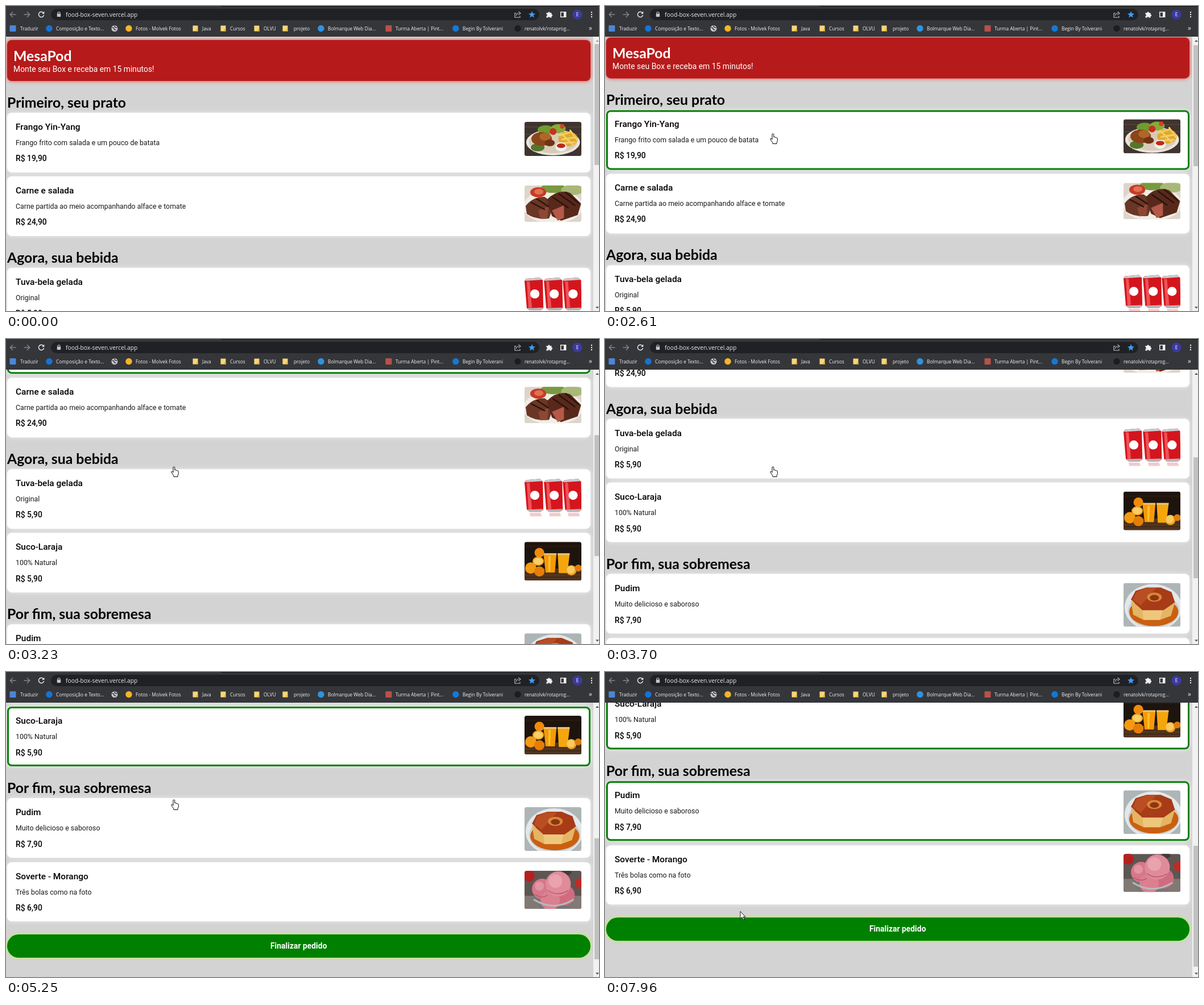
An HTML page for the animation above (8000 ms loop, 1043x537 px).

```html
<!DOCTYPE html>
<html lang="pt-BR">
<head>
<meta charset="utf-8">
<title>MesaPod</title>
<style>
  html, body { margin: 0; width: 100%; height: 100%; overflow: hidden; background: #d3d3d3; }
  #stage { position: relative; width: 1043px; height: 537px; overflow: hidden; font-family: Roboto, sans-serif; color: #000; }
  #view { position: absolute; left: 0; top: 54px; width: 1033px; height: 483px; overflow: hidden; background: #d3d3d3; }
  #page { position: absolute; left: 0; top: -54px; width: 1033px; height: 1080px; }
  #page div, #page svg { position: absolute; box-sizing: border-box; }
  .line { line-height: 20px; white-space: nowrap; }
  .head { font: 700 24.8px/20px Lato, sans-serif; }
  .name { font-size: 15.45px; font-weight: 500; }
  .desc { font-size: 12.36px; color: #1a1a1a; }
  .price { font-size: 13.9px; font-weight: 500; }
  .card { left: 1.5px; width: 1026.5px; height: 104.5px; border: 3.9px solid #fff; border-radius: 8px; background: #fff; box-shadow: 0 0 8px rgba(255, 255, 255, .6); }
  .banner { left: 1.5px; top: 60px; width: 1026.5px; height: 71.5px; border-radius: 8px; background: #b71a1a; box-shadow: 0 0 6px rgba(255, 0, 0, .75); }
  .order { left: 1.5px; top: 974px; width: 1026.5px; height: 40.5px; border-radius: 20.3px; background: #008000; box-shadow: 0 0 5px #adff2f; color: #fff; font: 700 13.9px/41px Roboto, sans-serif; text-align: center; }
  .photo { left: 911.5px; width: 100.5px; border-radius: 3.5px; overflow: hidden; }
  #ui { position: absolute; left: 0; top: 0; }
  #ui text { font-family: "Open Sans", sans-serif; }
</style>
</head>
<body>
<div id="stage">
  <div id="view"><div id="page"></div></div>
  <svg id="ui" width="1043" height="537" viewBox="0 0 1043 537">
    <rect x="1033" y="54" width="10" height="483" fill="#f1f1f1"/>
    <rect id="thumb" x="1035" y="67" width="8" height="213" fill="#c1c1c1"/>
    <path id="up" d="M1037 63l3-3.2 3 3.2z"/>
    <path d="M1037 529.5l3 3.2 3-3.2z" fill="#505050"/>
    <rect width="1043" height="54" fill="#35363a"/>
    <rect x="378" width="665" height="1" fill="#111"/>
    <rect x="79" y="5" width="859" height="20" rx="10" fill="#202124"/>
    <g fill="none" stroke="#85878b" stroke-width="1.4">
      <path d="M17.500 15H7.500M12 10.300L7.300 15L12 19.700M31.500 15H41.500M37 10.300L41.700 15L37 19.700"/>
      <path stroke="#eee" d="M65.600 11.700A4.700 4.700 0 1 0 66.700 16"/>
      <path stroke="#c4c6c9" stroke-width="1.100" d="M897.500 12.500H895V20H904V17.500M897.500 17Q898 13 902 12.700M901.500 10L905 12.800L901.500 15.600"/>
      <path stroke="#c4c6c9" stroke-width="1.200" d="M91 14V12.500a2 2 0 0 1 4 0V14"/>
      <rect x="975.700" y="10.700" width="9" height="8.600" stroke="#f1f1f1"/>
    </g>
    <path d="M67.300 9.500V13.700H63.100z" fill="#eee"/>
    <rect x="89.800" y="13.600" width="6.400" height="5.400" rx=".6" fill="#c4c6c9"/>
    <path d="M925 9l1.700 4 4.300.4-3.300 2.800 1 4.200-3.700-2.300-3.700 2.300 1-4.200-3.300-2.800 4.300-.4z" fill="#3b9cf5"/>
    <path d="M950.500 12h2.800a1.700 1.700 0 1 1 3.400 0h2.800v2.800a1.700 1.700 0 1 1 0 3.400v2.300h-3a1.500 1.500 0 0 0-3 0h-3v-3a1.500 1.500 0 0 0 0-3z" fill="#f1f1f1"/>
    <path d="M981 11h4v8h-4z" fill="#f1f1f1"/>
    <circle cx="1005" cy="15" r="8.600" fill="#3c3aa0"/>
    <text x="1005" y="18" font-size="8.300" fill="#fff" text-anchor="middle">E</text>
    <g fill="#eee"><circle cx="1030" cy="11" r="1.200"/><circle cx="1030" cy="15" r="1.200"/><circle cx="1030" cy="19" r="1.200"/></g>
    <text x="105" y="18.500" font-size="10.300" fill="#e8eaed">food-box-seven.vercel.app</text>
    <g id="marks" font-size="8.350" fill="#f1f1f1"></g>
    <g fill="#fff" stroke="#000" stroke-linejoin="round">
      <path id="hand" d="M4 1.800Q5.500-.3 6.800 1.800V6.600Q8.400 5.800 9 7.200Q10.600 6.600 11.200 8Q13.200 7.600 13.400 9.600V12.500Q13.200 15 12 16.500V18.500H5V16.800Q3 14 .8 10.600Q.6 8.600 2.600 9.400L4 11Z"/>
      <path id="arrow" stroke-width=".9" d="M0 .5V13.500L3 10.800L5 15.500L7 14.700L5 10.100H9Z"/>
    </g>
  </svg>
</div>
<script>
const LOOP = 8000;
const $ = id => document.getElementById(id);

// small SVG helpers for the pictures
const disc = (x, y, rx, fill, ry = rx) => `<ellipse cx="${x}" cy="${y}" rx="${rx}" ry="${ry}" fill="${fill}"/>`;
const shape = (d, fill) => `<path d="${d}" fill="${fill}"/>`;
const box = (x, y, w, h, fill, r = 0) => `<rect x="${x}" y="${y}" width="${w}" height="${h}" rx="${r}" fill="${fill}"/>`;
const stroke = (d, color, w) => `<path d="${d}" fill="none" stroke="${color}" stroke-width="${w}" stroke-linecap="round"/>`;

const can = x => `<g transform="translate(${x} 0)">`
  + shape('M3 3L27 1L32 6L33 55L28 59H9L4 55L0 7Z', '#d4151d')
  + shape('M3 3L27 1L31 5L1 7Z', '#c9c9cc') + shape('M4 55L33 54L28 59H9Z', '#b9b4b6')
  + shape('M4 8L9 8L13 54L7 55Z', '#ee5257') + disc(18, 30, 8, '#fff')
  + shape('M9 61H28L30 67H10Z', '#f3c9cb') + '</g>';

const photos = {
  chicken: [60, box(0, 0, 100, 60, '#40342e') + stroke('M0 9H100M0 22H100', '#5d4d44', 1)
    + disc(50, 36, 47, '#e9e4de', 23) + disc(50, 35, 42, '#d8cbb8', 20)
    + disc(37, 14, 14, '#6f9c2c', 8) + disc(59, 12, 13, '#86ab38', 8) + disc(50, 17, 6, '#c9301f') + disc(66, 8, 4, '#d6402a')
    + disc(23, 45, 12, '#55762a', 7) + disc(30, 30, 18, '#8a451b', 12) + disc(36, 26, 10, '#b0662a', 7) + disc(44, 37, 9, '#6f3414', 6)
    + disc(76, 30, 17, '#e2a92f', 13) + stroke('M62 24L80 18M66 31L90 27M70 37L88 36M64 20L84 40M80 15L92 32', '#f3cf62', 3)
    + disc(64, 44, 10, '#f4f1ec', 8) + disc(64, 42, 7.500, '#bd2a18', 4)],
  steak: [64, box(0, 0, 100, 64, '#ddd5ca') + disc(50, 37, 52, '#f0ece6', 30)
    + disc(50, 5, 22, '#78993f', 8) + disc(84, 8, 20, '#a9b878', 9) + disc(24, 12, 14, '#c73a26', 9) + disc(25, 11, 8, '#df7253', 5)
    + shape('M2 36Q14 20 35 20L52 32L43 58Q20 61 4 50Z', '#6a3625')
    + shape('M39 25Q58 5 80 13L99 32L93 52L64 62L48 54Z', '#58291b')
    + shape('M48 44L69 35L69 57L58 62Z', '#b45949') + shape('M24 44L42 37L40 57L28 59Z', '#8d4834')
    + stroke('M50 21L76 39M61 15L88 35M72 12L95 31M12 30L35 42M22 24L42 37', '#2c130d', 2.500)],
  cans: [74, box(0, 0, 100, 74, '#fff') + can(0) + can(34) + can(67)],
  juice: [67.500, box(0, 0, 100, 68, '#1e140e') + box(0, 47, 100, 21, '#51341f') + stroke('M0 8H100M0 55H100M0 62H100', '#35210f', 1)
    + disc(26, 19, 8.500, '#f08a0c') + disc(11, 46, 10, '#f39a12') + disc(26, 52, 9, '#e67d08')
    + disc(24, 34, 10, '#f0a321', 8) + disc(24, 34, 8, '#f9cf66', 6)
    + shape('M33 21H56L53 54H37Z', '#f59a07') + shape('M58 21H79L75 55H60Z', '#f5a60d') + box(34, 20, 22, 3, '#e8c47c') + box(58, 20, 21, 3, '#e8c47c')
    + shape('M42 25H46L45 52H42Z', '#ffc02f') + disc(82, 50, 9, '#f2a01c') + disc(81, 49, 7, '#f8cb61') + disc(94, 46, 6, '#df7d0b')],
  flan: [76.500, box(0, 0, 100, 77, '#aeb5b7') + disc(52, 43, 50, '#e3e7e8', 41) + disc(53, 49, 45, '#c9cfd1', 30) + disc(53, 51, 43, '#cb5f10', 25)
    + shape('M13 31L17 56L35 65H64L83 58L90 34L70 47H33Z', '#e4b564') + shape('M33 46L35 65H64L69 46Z', '#eec77c')
    + shape('M13 29L21 14L40 8H65L84 16L90 34L70 48H33Z', '#a83b18') + shape('M22 16L40 9H57L30 40L17 30Z', '#b94e22')
    + disc(54, 25, 13, '#d8873a', 8) + disc(54, 26, 8, '#8e3514', 5)],
  icecream: [67, box(0, 0, 100, 67, '#5d5653') + box(0, 44, 100, 23, '#817974') + disc(8, 9, 10, '#b5201f') + disc(97, 22, 9, '#c22a24') + disc(74, 3, 8, '#443a37', 5)
    + shape('M14 44H88L77 67H28Z', '#77777a') + disc(31, 32, 18, '#d6778a') + disc(70, 43, 18, '#cf6c80') + disc(45, 52, 17, '#da8090')
    + disc(59, 23, 22, '#e08b9a') + disc(54, 18, 12, '#eaa2ae') + disc(26, 27, 8, '#e394a2')
    + stroke('M17 51Q50 72 85 51', '#b9b9bc', 3) + stroke('M42 35Q57 46 76 35M19 42Q30 50 40 43', '#b9586d', 1.500)],
};

// [top, name, description, price, picture]
const cards = [
  [188, 'Frango Yin-Yang', 'Frango frito com salada e um pouco de batata', '19,90', 'chicken'],
  [300.200, 'Carne e salada', 'Carne partida ao meio acompanhando alface e tomate', '24,90', 'steak'],
  [461.100, 'Tuva-bela gelada', 'Original', '5,90', 'cans'],
  [573.400, 'Suco-Laraja', '100% Natural', '5,90', 'juice'],
  [734.400, 'Pudim', 'Muito delicioso e saboroso', '7,90', 'flan'],
  [846.700, 'Soverte - Morango', 'Três bolas como na foto', '6,90', 'icecream'],
];

const line = (cls, x, mid, text, style = '') =>
  `<div class="line ${cls}" style="left:${x}px;top:${mid - 10}px;${style}">${text}</div>`;

function cardHtml([top, name, desc, price, pic]) {
  const [h, art] = photos[pic];
  return `<div class="card" style="top:${top}px"></div>`
    + line('name', 17, top + 25, name) + line('desc', 17, top + 53, desc) + line('price', 17, top + 80.200, 'R$ ' + price)
    + `<svg class="photo" style="top:${top + 15.700}px;height:${h}px" viewBox="0 0 100 ${h}" preserveAspectRatio="none">${art}</svg>`;
}

$('page').innerHTML = '<div class="banner"></div>'
  + line('head', 13, 88, 'MesaPod', 'color:#fff')
  + line('', 13, 111.300, 'Monte seu Box e receba em 15 minutos!', 'color:#fff;font-size:13.9px')
  + line('head', 2, 169.500, 'Primeiro, seu prato')
  + line('head', 2, 442.700, 'Agora, sua bebida')
  + line('head', 2, 715.900, 'Por fim, sua sobremesa')
  + cards.map(cardHtml).join('')
  + '<div class="order">Finalizar pedido</div>';

// bookmarks: [icon x, text x, label, icon kind, colour]
const folder = '#f7d774';
const marks = [
  [12, 25, 'Traduzir', 'square', '#4a86d8'],
  [76, 88, 'Composição e Texto...', 'disc', '#1673d6'],
  [191, 0, '', 'globe', '#c9cbce'],
  [216, 228, 'Fotos - Molvek Fotos', 'disc', '#f4b526'],
  [333, 345, 'Java', 'folder', folder],
  [382, 394, 'Cursos', 'folder', folder],
  [441, 453, 'OLVU', 'folder', folder],
  [491, 506, 'projeto', 'folder', folder],
  [554, 566, 'Bolmarque Web Dia...', 'disc', '#2f94df'],
  [673, 685, 'Turma Aberta | Pint...', 'square', '#b8514a'],
  [791, 803, 'Begin By Tolverani', 'disc', '#1479d6'],
  [900, 912, 'renatolvk/rotaprog...', 'disc', '#1c1d20'],
];
const icons = {
  square: (x, c) => box(x - 5.500, 34, 11, 11, c, 1),
  disc: (x, c) => disc(x, 39.500, 5.700, c),
  folder: (x, c) => shape(`M${x - 4.500} 34.500h9v10h-9z`, c) + shape(`M${x + 2} 41h3v3.500h-3z`, '#e0ac3c'),
  globe: (x, c) => disc(x, 39.500, 5.500, c) + stroke(`M${x - 4} 38q3 0 3 2t3 2M${x} 35q0 3 4 3`, '#35363a', 1.500),
};
$('marks').innerHTML = marks.map(([x, tx, label, kind, color]) =>
  icons[kind](x, color) + `<text x="${tx}" y="42.500">${label}</text>`).join('')
  + '<text x="1025" y="43" font-size="12">»</text>';

// timelines: each value holds until the next time
const scrollSteps = [
  [0, 0], [2610, 4.600], [2680, 27], [2750, 55], [2820, 83], [2890, 111], [2960, 137.700],
  [3060, 173], [3120, 200], [3180, 222], [3230, 231.800],
  [3490, 236.400], [3560, 260], [3630, 290], [3700, 320.400], [3770, 352], [3840, 376], [3910, 386.600],
  [4910, 391.500], [4980, 418], [5060, 450], [5140, 483], [5220, 512], [5310, 533], [5390, 541.700],
];
const picks = {
  0: [[0, 0], [1910, .35], [2010, .8], [2110, 1]],
  3: [[0, 0], [4260, .35], [4320, .8], [4380, 1]],
  4: [[0, 0], [7000, .5], [7070, 1]],
  5: [[0, 0], [6080, .5], [6200, 1], [7000, .5], [7070, 0]],
};
const rest = [295, 224];
const entry = Array.from({ length: 12 }, (_, i) => {
  const left = (1 - i / 11) ** 1.600;
  return [260 + i * 69.090, [rest[0] + 649 * left, rest[1] + 302 * left]];
});
const cursorSteps = [
  [0, null], ...entry, [1020, rest],
  [5590, [283, 250]], [5660, [262, 305]], [5730, [241, 360]], [5800, [231, 386]],
  [6660, [222, 345]], [6730, [211, 300]], [6800, [215, 276]],
  [7820, [222, 320]], [7890, [236, 385]], [7960, [238, 421]],
];

function at(steps, t) {
  let value = steps[0][1];
  for (const [time, v] of steps) if (time <= t) value = v;
  return value;
}

const cardEls = document.querySelectorAll('.card');

function placeCursor(pos, scroll) {
  const over = pos && cards.some(([top]) => pos[1] + scroll >= top && pos[1] + scroll <= top + 104.500);
  const scrolling = pos === rest;
  const hand = over || scrolling;
  $('hand').style.display = pos && hand ? '' : 'none';
  $('arrow').style.display = pos && !hand ? '' : 'none';
  if (!pos) return;
  $('hand').setAttribute('transform', `translate(${pos[0] - 5} ${pos[1]})`);
  $('arrow').setAttribute('transform', `translate(${pos[0]} ${pos[1]})`);
}

function draw(t) {
  const scroll = at(scrollSteps, t);
  $('page').style.transform = `translateY(${-scroll}px)`;
  $('thumb').setAttribute('y', 67 + scroll * .441);
  $('up').setAttribute('fill', scroll ? '#505050' : '#a3a3a3');
  for (const i in picks) {
    const k = at(picks[i], t), rb = 255 * (1 - k);
    cardEls[i].style.borderColor = `rgb(${rb}, ${255 - 127 * k}, ${rb})`;
  }
  placeCursor(at(cursorSteps, t), scroll);
}

const start = performance.now();
function tick() {
  draw((performance.now() - start) % LOOP);
  requestAnimationFrame(tick);
}
tick();
</script>
</body>
</html>
```
